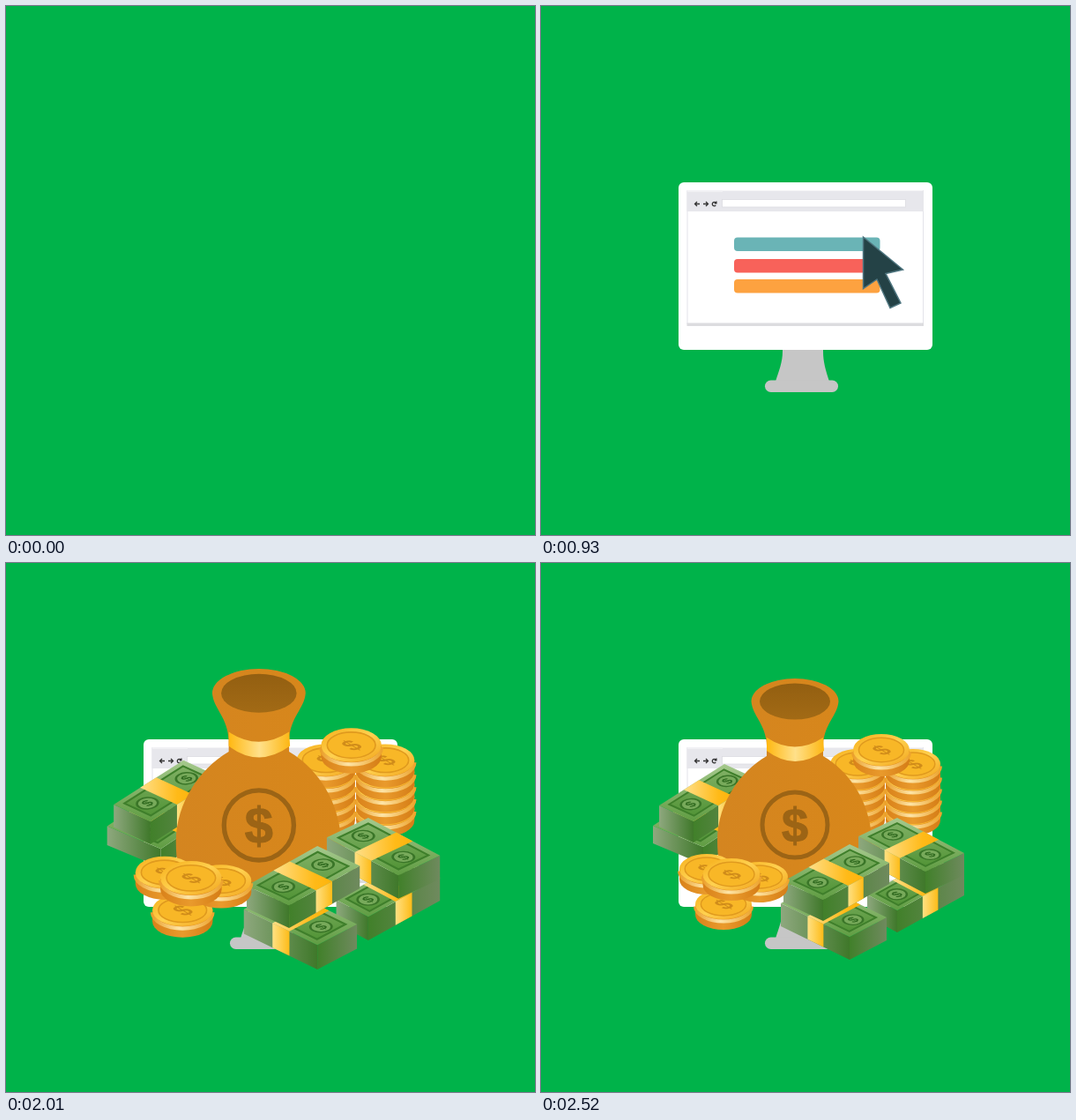
Animation of 600x600 px, one loop 2850 ms. Source, as an HTML page:

```html
<!DOCTYPE html>
<html lang="en">
<head>
<meta charset="utf-8">
<title>Clicks to cash</title>
<style>
html, body { margin: 0; width: 100%; height: 100%; overflow: hidden; background: #00b34a; }
svg { display: block; width: 100vw; height: 100vh; }
text { font-family: "Liberation Sans", Arial, sans-serif; font-weight: bold; text-anchor: middle; }
</style>
</head>
<body>
<svg viewBox="0 0 600 600">
  <defs>
    <linearGradient id="endL"><stop offset="0" stop-color="#8ea87e"/><stop offset="1" stop-color="#3f782a"/></linearGradient>
    <linearGradient id="endR"><stop offset="0" stop-color="#41802a"/><stop offset="1" stop-color="#6f8a5e"/></linearGradient>
    <linearGradient id="note" x1="0" y1="0" x2="0" y2="1"><stop offset="0" stop-color="#a6c98d"/><stop offset="1" stop-color="#5f9c42"/></linearGradient>
    <linearGradient id="print" x1="0" y1="0" x2="0" y2="1"><stop offset="0" stop-color="#80b064"/><stop offset="1" stop-color="#529437"/></linearGradient>
    <linearGradient id="strap"><stop offset="0" stop-color="#ffb812"/><stop offset=".5" stop-color="#ffe08a"/><stop offset="1" stop-color="#fdb714"/></linearGradient>
    <linearGradient id="strapTop"><stop offset="0" stop-color="#ffdf88"/><stop offset=".7" stop-color="#ffba18"/><stop offset="1" stop-color="#fdb40c"/></linearGradient>
    <linearGradient id="strapSide"><stop offset="0" stop-color="#ffe183"/><stop offset="1" stop-color="#fdbb18"/></linearGradient>
    <linearGradient id="rim"><stop offset="0" stop-color="#d9821b"/><stop offset=".5" stop-color="#e99a2c"/><stop offset="1" stop-color="#d57d17"/></linearGradient>
    <linearGradient id="shine"><stop offset="0" stop-color="#eba02b"/><stop offset=".45" stop-color="#fde4a6"/><stop offset="1" stop-color="#eda42e"/></linearGradient>
    <linearGradient id="face" x1="0" y1="0" x2="1" y2="1"><stop offset="0" stop-color="#f6ae18"/><stop offset=".5" stop-color="#ffd150"/><stop offset="1" stop-color="#f2a51c"/></linearGradient>
    <linearGradient id="hole" x1="0" y1="0" x2="0" y2="1"><stop offset="0" stop-color="#935f11"/><stop offset="1" stop-color="#a26a15"/></linearGradient>
    <linearGradient id="sack"><stop offset="0" stop-color="#d48520"/><stop offset="1" stop-color="#d8871a"/></linearGradient>
  </defs>

  <g id="monitor">
    <path d="M274 388H320V392C320 404 323 413 327 426H266C270 413 274 404 274 392Z" fill="#c6c6c6"/>
    <rect x="254" y="424.500" width="83" height="13.500" rx="6.700" fill="#c6c6c6"/>
    <rect x="156" y="200" width="288" height="190" rx="6" fill="#fff"/>
    <path d="M166 209V361M433.500 209V361" stroke="#e3e3ea" fill="none"/>
    <rect x="165.500" y="209.500" width="268.500" height="23.500" fill="#e7e7ec"/>
    <rect x="166" y="209" width="40" height="2" fill="#f1f1f4"/>
    <rect x="205.500" y="219.500" width="208" height="8.500" fill="#fff" stroke="#d9d9df" stroke-width=".7"/>
    <rect x="165.500" y="359.500" width="268.500" height="3.500" fill="#dcdcdf"/>
    <g fill="none" stroke="#333" stroke-width="1.300">
      <path d="M180 224.500H174.500M177 222L174.500 224.500L177 227M184 224.500H189.500M187 222L189.500 224.500L187 227"/>
      <path d="M198.200 223.200A2.200 2.200 0 1 0 198.200 226M196.700 223.800H198.900V221.600"/>
    </g>
    <rect x="219" y="262.500" width="165.500" height="15.500" rx="4" fill="#6ab4b6"/>
    <rect x="219" y="287" width="165.500" height="15.500" rx="4" fill="#f8625a"/>
    <rect x="219" y="310" width="165.500" height="15.500" rx="4" fill="#fda240"/>
  </g>

  <g id="ring" fill="none" stroke="#18b2ea">
    <circle r="12.300" stroke-width="2.300"/>
    <circle r="8.200" stroke-width="1.900"/>
  </g>
  <path id="cursor" d="M-22.500 -40L22.500 -3L3 1.500L20 35L8 40.500L-7 8L-22.500 18.500Z"
    fill="#244246" stroke="#4f7680" stroke-width="1.500"/>
  <g id="money"></g>
</svg>
<script>
const $ = id => document.getElementById(id);
const LOOP = 2850, STEP = 30;

// ---- artwork ----
const add = (...v) => v.reduce((p, q) => [p[0] + q[0], p[1] + q[1]]);
const mul = (v, k) => [v[0] * k, v[1] * k];
const unit = v => mul(v, 1 / Math.hypot(...v));
const poly = (pts, fill, extra = '') => `<polygon points="${pts.join(' ')}" fill="${fill}" ${extra}/>`;

// Bundle of notes: front corner f, edges a (left) and b (right), height h.
function bundle(f, a, b, h, longLeft) {
  const at = (i, j, d = 0) => add(f, mul(a, i), mul(b, j), [0, d]);
  const on = (l, s, d) => longLeft ? at(l, s, d) : at(s, l, d);
  const quad = (l0, l1, s0, s1) => [on(l0, s0), on(l1, s0), on(l1, s1), on(l0, s1)];
  const x = unit(b), y = unit(mul(a, -1));
  const seal = l => `<g transform="matrix(${[...x, ...y, ...on(l, .5)]})">
    <circle r="9" fill="#78aa5b" stroke="#3a7528" stroke-width="2"/>
    <text y="4.800" font-size="14" fill="#2f691f">$</text></g>`;
  return poly([at(0, 0), at(1, 0), at(1, 0, h), at(0, 0, h)], 'url(#endL)')
    + poly([at(0, 0), at(0, 1), at(0, 1, h), at(0, 0, h)], 'url(#endR)')
    + poly(quad(0, 1, 0, 1), 'url(#note)')
    + poly(quad(.08, .92, .14, .86), 'url(#print)', 'stroke="#3f7f2b" stroke-width="2"')
    + seal(.22) + seal(.78)
    + poly(quad(.38, .61, 0, 1), 'url(#strapTop)')
    + poly([on(.38, 0), on(.61, 0), on(.61, 0, h), on(.38, 0, h)], 'url(#strapSide)');
}

// Coin with its top face centred at x, y.
function coin(x, y, r = 32, ry = 17, h = 12) {
  const side = d => `M${x - r} ${y + d}A${r} ${ry} 0 0 0 ${x + r} ${y + d}`;
  return `<path d="${side(h)}V${y}H${x - r}Z" fill="url(#rim)"/>
    <path d="${side(2.5)}" fill="none" stroke="url(#shine)" stroke-width="4"/>
    <ellipse cx="${x}" cy="${y}" rx="${r}" ry="${ry}" fill="url(#face)"/>
    <ellipse cx="${x}" cy="${y}" rx="${r * .8}" ry="${ry * .76}" fill="#f8b727" stroke="#e09a1e" stroke-width="1.500"/>
    <text y="9" transform="matrix(.85 -.32 .85 .5 ${x} ${y})" font-size="25" fill="#d08c1a">$</text>`;
}

const pile = (x, y, n, gap) =>
  Array.from({length: n}, (_, i) => coin(x, y + (n - 1 - i) * gap, 31)).join('');

const bag = `
  <path d="M238.500 157C240 174 255 182 256 207V219C222 239 200 277 200 314C200 336 203 350 214 365H365C374 350 376 330 375 310C372 272 352 238 320 219V207C321 182 336 174 337.500 157A49.500 26 0 0 0 238.500 157Z" fill="url(#sack)"/>
  <ellipse cx="288" cy="157" rx="40" ry="20.500" fill="url(#hole)"/>
  <path d="M256 198Q288 219 320 198L321 213Q288 237 256 213Z" fill="url(#strap)"/>
  <circle cx="288" cy="297" r="37" fill="none" stroke="#9c6415" stroke-width="5"/>
  <text x="288" y="316" font-size="54" fill="#9c6415" stroke="#9c6415">$</text>`;

$('money').innerHTML = [
  bundle([184, 322], [-57, -24], [60, -40], 20, false),
  bundle([173, 293], [-39, -18], [74, -47], 24, false),
  pile(359, 228, 5, 13), pile(422, 228, 5, 13), coin(386, 212, 32, 18),
  bag,
  bundle([404, 394], [-34, -18], [76, -42], 25, false),
  bundle([436, 350], [-76, -40], [44, -21], 25, true),
  bundle([350, 424], [-78, -38], [42, -22], 26, true),
  bundle([320, 382], [-45, -21], [75, -42], 24, false),
  coin(207, 387), coin(188, 347, 31), coin(248, 356), coin(216, 353, 32.5, 18)
].join('');

// ---- motion ----
const linear = k => k;
const fall = k => k * k;
const out = k => Math.sin(k * Math.PI / 2);
const soft = k => (1 - Math.cos(k * Math.PI)) / 2;

// Rows are [time, value, easing towards this row].
function tween(rows, t) {
  const i = rows.findIndex(r => r[0] > t);
  if (i === 0) return rows[0][1];
  if (i < 0) return rows[rows.length - 1][1];
  const [t0, v0] = rows[i - 1], [t1, v1, ease = soft] = rows[i];
  return v0 + (v1 - v0) * ease((t - t0) / (t1 - t0));
}

const drop = [[60, -65], [270, 25, fall], [330, 0, out]];
const travel = [[960, 302], [1140, 329.5, linear], [1320, 329.5], [1440, 356.5, linear]];
const pop = [[1650, 0], [1980, 1.076, out], [2520, 1, out]];
const clicks = [[660, 270], [1140, 296], [1440, 322]];
const CLICK = 180, HOLD = 240;

const show = (el, on) => el.setAttribute('visibility', on ? 'visible' : 'hidden');
const place = (el, x, y, s = 1) => el.setAttribute('transform', `translate(${x} ${y}) scale(${s})`);

function draw(t) {
  show($('monitor'), t >= 60);
  place($('monitor'), 0, tween(drop, t));

  const pointing = t >= 570 && t < 1980;
  const click = clicks.find(([c]) => t >= c && t < c + HOLD);
  const k = click ? Math.min(1, (t - click[0]) / CLICK) : 0;
  show($('cursor'), pointing);
  place($('cursor'), 388, tween(travel, t), 1 + .08 * Math.sin(k * Math.PI));
  show($('ring'), pointing && k >= .4);
  if (click) place($('ring'), 369, click[1]);

  const s = tween(pop, t);
  show($('money'), t >= 1680);
  place($('money'), 304.5 * (1 - s), 290.5 * (1 - s), s);
}

const start = performance.now();
function tick() {
  const t = (performance.now() - start) % LOOP;
  draw(Math.floor(t / STEP) * STEP);
  requestAnimationFrame(tick);
}
tick();
</script>
</body>
</html>
```
